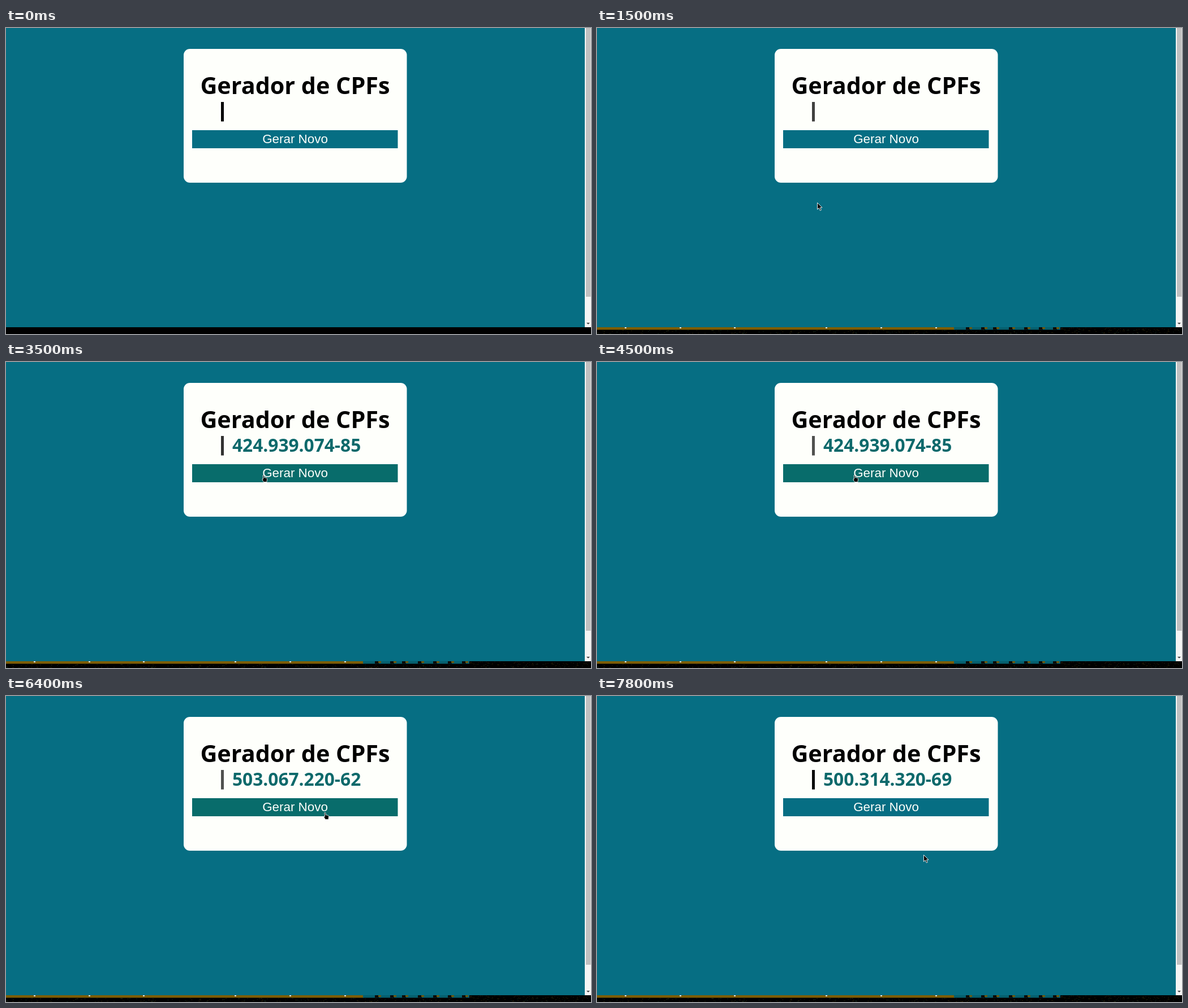
Recreate the animation shown at these times as an HTML page. Size 1034 px wide and 542 px high, loop 8000 ms.

```html
<!DOCTYPE html>
<html lang="pt-BR">
<head>
<meta charset="utf-8">
<title>Gerador de CPFs</title>
<style>
  html, body { margin: 0; width: 100%; height: 100%; overflow: hidden; background: #066e83; }
  svg { display: block; width: 1034px; height: 542px; }
  .bold { font-family: "Open Sans", "Noto Sans", sans-serif; font-weight: 700; }
  .label { font-family: "Liberation Sans", Arial, sans-serif; }
</style>
</head>
<body>
<svg viewBox="0 0 1034 542">
  <rect width="1034" height="542" fill="#066e83"/>

  <rect x="314" y="37" width="394.5" height="237" rx="11" fill="#fefffb"/>
  <text class="bold" x="511" y="116.5" font-size="41.3" text-anchor="middle">Gerador de CPFs</text>
  <rect id="caret" x="380" y="131" width="5" height="34.5"/>
  <text id="number" class="bold" x="400" y="158.7" font-size="31.7" fill="#0d696b"></text>
  <rect id="button" x="329" y="181" width="363.5" height="32"/>
  <text class="label" x="511" y="204" font-size="22.4" text-anchor="middle" fill="#fefffb">Gerar Novo</text>

  <rect x="1023" width="11" height="530" fill="#f5f5f4"/>
  <rect x="1025" width="8.5" height="476" fill="#c1c0c0"/>
  <path d="M1026 522h6l-3 3z" fill="#444"/>

  <rect y="530" width="1034" height="12"/>
  <g id="strip">
    <rect y="530" width="632" height="4.5" fill="#7d5d06"/>
    <rect x="631" y="530" width="188" height="4.5" fill="#06606f"/>
  </g>

  <g id="arrow" stroke="#fff" stroke-width=".9" stroke-linejoin="round">
    <path d="M.5 .5V12.3L3.2 9.8 5.3 14.3 7.3 13.4 5.3 9.1H9z"/>
  </g>
  <g id="hand" stroke="#eee" stroke-width=".9" stroke-linejoin="round">
    <path d="M1 .7Q2.4 -.1 3.2 1.2V4.6L7.4 5.3Q8.6 5.6 8.5 7L8 12.6H2.6L.2 9V7L1.6 7.2Z"/>
  </g>
</svg>
<script>
const LOOP = 8000, STEP = 100;
const $ = id => document.getElementById(id);

const numbers = [
  [0, ""], [2300, "891.982.013-95"], [3500, "424.939.074-85"],
  [5500, "904.733.122-20"], [6300, "503.067.220-62"], [7000, "500.314.320-69"]
];
// Time, x, y of the pointer tip
const path = [
  [1000, 380, 529], [1500, 389, 309], [2100, 453, 200], [4800, 453, 200],
  [5500, 528, 200], [6000, 528, 200], [6700, 584, 210], [7000, 584, 210], [7500, 577, 281]
];
const pulses = [-950, 50, 1050, 2000, 3000, 4100, 5030, 6000, 7000];

// CSS "ease": cubic-bezier(.25, .1, .25, 1)
function ease(x) {
  const bezier = (u, a, b) => 3 * u * (1 - u) * ((1 - u) * a + u * b) + u ** 3;
  let low = 0, high = 1;
  for (let i = 0; i < 20; i++) {
    const mid = (low + high) / 2;
    if (bezier(mid, .25, .25) < x) low = mid; else high = mid;
  }
  return bezier(low, .1, 1);
}

function pointerAt(t) {
  const i = path.findIndex(p => p[0] > t);
  if (i < 0) return path[path.length - 1].slice(1);
  if (i === 0) return null;
  const [t0, x0, y0] = path[i - 1], [t1, x1, y1] = path[i];
  const k = (t - t0) / (t1 - t0), s = k * k * (3 - 2 * k);
  return [x0 + (x1 - x0) * s, y0 + (y1 - y0) * s];
}

function addRect(x, y, width, height, fill) {
  const rect = document.createElementNS("http://www.w3.org/2000/svg", "rect");
  Object.entries({ x, y, width, height, fill }).forEach(([k, v]) => rect.setAttribute(k, v));
  $("strip").append(rect);
}

function buildStrip() {
  let seed = 7;
  const random = () => (seed = seed * 16807 % 2147483647) / 2147483647;
  for (const x of [49, 146, 242, 404, 501, 598]) addRect(x, 530, 3, 2, "#e8e4d8");
  for (const x of [652, 679, 700, 728, 755, 781, 806]) {
    addRect(x, 530, 7, 4.5, "#0a0a08");
    addRect(x + 6, 530, 5, 3, "#6f5608");
  }
  for (let i = 0; i < 260; i++) {
    const x = Math.floor(random() * 1034), y = 535 + Math.floor(random() * 7);
    addRect(x, y, 1 + Math.floor(random() * 3), 1, ["#171304", "#0a1a12", "#211b07"][i % 3]);
  }
  for (let i = 0; i < 60; i++) {
    addRect(820 + Math.floor(random() * 214), 531 + Math.floor(random() * 5), 2, 1, "#1b1705");
  }
}

function render(t) {
  $("strip").style.display = t >= 100 ? "" : "none";
  $("number").textContent = numbers.filter(n => n[0] <= t).pop()[1];

  const start = pulses.filter(p => p <= t).pop();
  $("caret").setAttribute("opacity", ease(Math.min(1, (t - start) / 1000)));

  const tip = pointerAt(t);
  const hover = !!tip && tip[0] >= 329 && tip[0] <= 692 && tip[1] >= 181 && tip[1] < 213;
  $("button").setAttribute("fill", hover ? "#086c6b" : "#066e83");
  $("arrow").style.display = tip && !hover ? "" : "none";
  $("hand").style.display = hover ? "" : "none";
  if (tip) $(hover ? "hand" : "arrow").setAttribute("transform", `translate(${tip})`);
}

function tick() {
  render(Math.floor(performance.now() % LOOP / STEP) * STEP);
  requestAnimationFrame(tick);
}

buildStrip();
tick();
</script>
</body>
</html>
```
